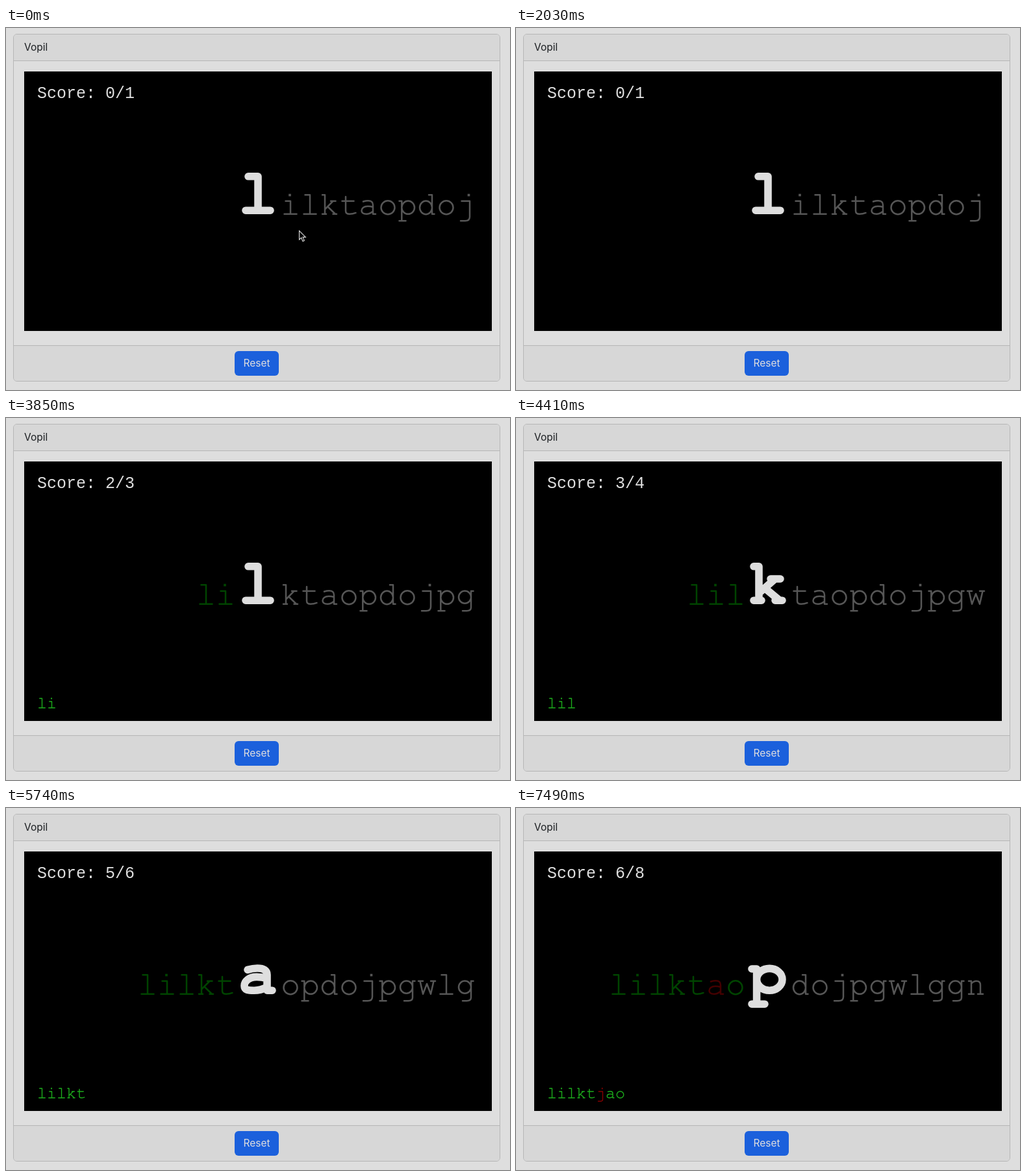
These frames come from a looping animation (776x558 px, 8 s). An HTML page with a canvas:

```html
<!DOCTYPE html>
<html lang="en">
<head>
<meta charset="utf-8">
<title>Typing drill</title>
<style>
  html, body { margin: 0; width: 100%; height: 100%; overflow: hidden; background: #dedede; }
  body { position: relative; font: 15.5px/24px Inter, Roboto, sans-serif; color: #1c1f22; }
  .card { position: absolute; left: 11px; top: 9px; width: 750px; height: 536px; box-sizing: border-box;
    border: 1px solid #b6b6b6; border-radius: 6px; overflow: hidden; }
  .bar { position: absolute; left: 0; right: 0; background: #d7d7d7; box-sizing: border-box; }
  .head { top: 0; height: 41px; padding: 8px 16px; border-bottom: 1px solid #b6b6b6; }
  .foot { bottom: 0; height: 55px; border-top: 1px solid #b6b6b6; }
  .reset { position: absolute; left: 340px; top: 8px; width: 68px; height: 38px; border-radius: 6px;
    background: #1b60dc; color: #dedede; line-height: 38px; text-align: center; }
  canvas { position: absolute; left: 28px; top: 67px; background: #000; }
  #pointer { position: absolute; left: 0; top: 0; }
</style>
</head>
<body>
<div class="card">
  <div class="bar head">Vopil</div>
  <div class="bar foot"><div class="reset">Reset</div></div>
</div>
<canvas id="game" width="720" height="400"></canvas>
<svg id="pointer" width="14" height="20" viewBox="-1 -1 14 20">
  <path d="M.5 .5V14.2L3.6 11.3L6 16.8L8.3 15.8L6 10.4H10.3Z" fill="#000" stroke="#dedede" stroke-width="1.1"/>
</svg>
<script>
const LOOP = 8000, TICK = 70;
const LETTERS = 'lilktaopdojpgwlggn';
const KEYS = [[2450, 'l'], [3710, 'i'], [4340, 'l'], [4900, 'k'], [5740, 't'], [6020, 'j'], [6370, 'a'], [7210, 'o']];
const POINTER = [[0, 451, 312], [420, 730, 395], [560, 730, 395], [910, 755, 463]];
const POINTER_GONE = 980;
const LIGHT = '#dedede', AHEAD = '#565656';
const PAST = { hit: '#004400', miss: '#440000' };
const TYPED = { hit: '#1cac1c', miss: '#860000' };

const ctx = document.getElementById('game').getContext('2d');
const pointer = document.getElementById('pointer');

// Slab letters as pen strokes in a 30 unit wide cell, baseline at y = 0.
const oval = (l, r, t, b) => {
  const arc = `A${(r - l) / 2} ${(b - t) / 2} 0 0 1 `;
  return `M${l} ${(t + b) / 2}${arc}${r} ${(t + b) / 2}${arc}${l} ${(t + b) / 2}`;
};
const bar = (from, to, y) => `M${from} ${y}H${to}`;
const GLYPHS = {
  l: (asc, mid, base) => bar(7.5, 15, asc) + `V${base}` + bar(5.5, 24.5, base),
  i: (asc, mid, base) => bar(7.5, 15, mid) + `V${base}` + bar(5.5, 24.5, base),
  j: (asc, mid, base, desc) => bar(8.5, 21, mid) + `V3Q21 ${desc} 14 ${desc}H7`,
  k: (asc, mid, base) => bar(4, 8, asc) + `V${base}` + bar(4, 10, base) + bar(17, 24.5, mid) + bar(20.5, 26, base) +
    `M8 -8.5L20.5 ${mid}M13 -12L24 ${base}`,
  t: (asc, mid, base) => `M10 -28V-6Q10 ${base} 16 ${base}Q21 ${base} 25.5 ${base - 1.8}` + bar(4.5, 22.5, mid),
  a: (asc, mid, base) => `M7 ${mid + .7}Q11 ${mid - .5} 14.5 ${mid - .5}Q22 ${mid - .5} 22 -15V${base}H26` +
    `M22 -12Q18 -13.3 14 -13.3C8 -13.3 4.5 -10 4.5 -6.5C4.5 -3 7.5 ${base} 12 ${base}Q17 ${base} 22 -5.5`,
  o: (asc, mid, base) => oval(4.5, 25.5, mid - .5, base + .5),
  p: (asc, mid, base, desc) => oval(6.3, 26, mid - .3, base) + bar(2.5, 6.3, mid) + `V${desc}` + bar(2.5, 12.5, desc),
  d: (asc, mid, base) => oval(4, 23, mid - .3, base + .4) + bar(18, 23, asc) + `V${base}H26.5`,
  g: (asc, mid, base, desc) => oval(4, 23, mid - .3, base - 1) + bar(26.5, 23, mid) + `V4Q23 ${desc} 16.5 ${desc}H10`,
  w: (asc, mid, base) => bar(2, 9, mid) + bar(21, 28, mid) + `M4.5 ${mid}L9 ${base}L15 -17L21 ${base}L25.5 ${mid}`,
  n: (asc, mid, base) => bar(4, 8, mid) + `V${base}` + bar(4, 12, base) + bar(18, 26, base) +
    `M8 -17Q11 ${mid} 16 ${mid}Q22 ${mid} 22 -15V${base}`
};

function drawLetter(letter, x, y, scale, pen, color) {
  const half = pen / 2;
  ctx.save();
  ctx.translate(x, y);
  ctx.scale(scale, scale);
  ctx.lineWidth = pen;
  ctx.lineCap = ctx.lineJoin = 'round';
  ctx.strokeStyle = ctx.fillStyle = color;
  ctx.stroke(new Path2D(GLYPHS[letter](half - 32, half - 22.4, -half, 10.5 - half)));
  if (letter === 'i' || letter === 'j') {
    const size = pen + 1.2;
    ctx.fillRect((letter === 'i' ? 14 : 19.5) - size / 2, -32.3, size, Math.min(size, 5.6));
  }
  ctx.restore();
}

function play(time) {
  const typed = KEYS.filter(([at]) => at <= time).map(([, key]) => key);
  const past = [], history = [];
  let clean = true, hits = 0;
  for (const key of typed) {
    const right = key === LETTERS[past.length];
    history.push([key, right ? 'hit' : 'miss']);
    if (right) {
      hits += clean;
      past.push([key, clean ? 'hit' : 'miss']);
    }
    clean = right;
  }
  return { past, history, hits };
}

function drawGame({ past, history, hits }) {
  const at = past.length;
  ctx.clearRect(0, 0, 720, 400);
  ctx.font = '25px "Liberation Mono", "Courier New", monospace';
  ctx.fillStyle = LIGHT;
  ctx.fillText(`Score: ${hits}/${at + 1}`, 20, 41);
  past.forEach(([key, mark], n) => drawLetter(key, 325 - 30 * (at - n), 221, 1, 2.5, PAST[mark]));
  drawLetter(LETTERS[at], 330, 220, 2, 5.8, LIGHT);
  [...LETTERS.slice(at + 1, at + 11)].forEach((key, n) => drawLetter(key, 395 + 30 * n, 221, 1, 2.5, AHEAD));
  history.forEach(([key, mark], n) => drawLetter(key, 20 + 15 * n, 380.5, .5, 2.8, TYPED[mark]));
}

function placePointer(time) {
  pointer.style.display = time < POINTER_GONE ? 'block' : 'none';
  const next = POINTER.findIndex(([at]) => at > time);
  const [t1, x1, y1] = POINTER.at(next < 0 ? -1 : next);
  const [t0, x0, y0] = POINTER.at(next < 0 ? -1 : next - 1);
  const part = t1 > t0 ? (time - t0) / (t1 - t0) : 0;
  const eased = part * part * (3 - 2 * part);
  const x = Math.round(x0 + (x1 - x0) * eased), y = Math.round(y0 + (y1 - y0) * eased);
  pointer.style.transform = `translate(${x - 1}px, ${y - 1}px)`;
}

const start = performance.now();
let drawn = -1;
function frame() {
  const time = Math.floor((performance.now() - start) % LOOP / TICK) * TICK;
  if (time !== drawn) {
    drawGame(play(time));
    placePointer(time);
    drawn = time;
  }
  requestAnimationFrame(frame);
}
frame();
</script>
</body>
</html>
```
